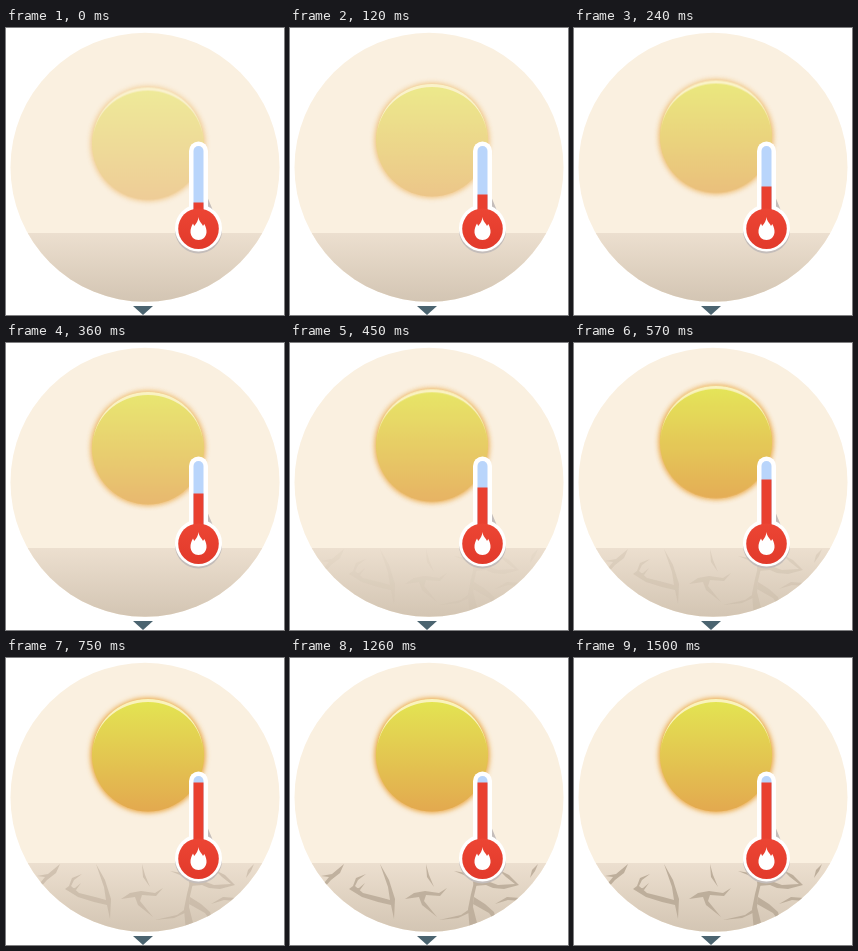
These frames come from a looping animation (278 px wide and 287 px high, 2.83 s). An HTML page:

```html
<!DOCTYPE html>
<html lang="en">
<head>
<meta charset="utf-8">
<title>Rising heat</title>
<style>
  html, body { margin: 0; width: 100%; height: 100%; overflow: hidden; background: #fff; }
  svg { display: block; width: 100vw; height: 100vh; }
  .sun, .level, .cracks { animation: 2830ms infinite both; }
  .sun { animation-name: rise; }
  .level { animation-name: heat; }
  .cracks { animation-name: dry; }

  @keyframes rise {
    0% { transform: translateY(18.5px); opacity: .5; animation-timing-function: steps(21); }
    22.26%, 100% { transform: none; opacity: 1; }
  }
  @keyframes heat {
    0% { transform: translateY(50px); animation-timing-function: steps(25); }
    26.5%, 100% { transform: none; }
  }
  @keyframes dry {
    0% { opacity: 0; }
    13.75% { opacity: 0; animation-timing-function: steps(12); }
    26.5% { opacity: .55; animation-timing-function: steps(1); }
    44.5% { opacity: .93; animation-timing-function: steps(1); }
    48.75% { opacity: .93; animation-timing-function: steps(4); }
    53%, 100% { opacity: 1; }
  }
</style>
</head>
<body>
<svg viewBox="0 0 278 287" preserveAspectRatio="none">
  <defs>
    <linearGradient id="sunFill" x2="0" y2="1">
      <stop stop-color="#e3e552"/>
      <stop offset="1" stop-color="#e3a94f"/>
    </linearGradient>
    <linearGradient id="groundFill" x2="0" y2="1">
      <stop stop-color="#ecdfcf"/>
      <stop offset="1" stop-color="#d3c5b3"/>
    </linearGradient>
    <linearGradient id="bulbFill" x2="0" y2="1">
      <stop stop-color="#ec4534"/>
      <stop offset="1" stop-color="#e23a2b"/>
    </linearGradient>
    <filter id="glow" x="-20%" y="-20%" width="140%" height="140%">
      <feGaussianBlur stdDeviation="2.6"/>
    </filter>
    <clipPath id="disc"><circle cx="139" cy="139.3" r="134.5"/></clipPath>
    <clipPath id="tube"><rect x="187.5" y="118" width="10" height="76" rx="5"/></clipPath>
  </defs>

  <g clip-path="url(#disc)">
    <rect width="278" height="287" fill="#faf0e0"/>
    <rect y="205" width="278" height="69" fill="url(#groundFill)"/>
    <g class="cracks" fill="#bdae9b">
      <path d="M54 206L50 215L41 222L33 231L30 230L39 219L31 218L42 216Z"/>
      <path d="M76 216L68 222L65 228L73 235L89 239L100 242L98 229L90 206L99 222L105 241L104 261L101 247L88 244L72 239L59 231L63 228L66 220Z"/>
      <path d="M60 231L69 230L75 225L70 232Z"/>
      <path d="M115 241L124 235L135 233L149 235L157 230L150 238L136 237L134 243L147 259L132 247L129 239Z"/>
      <path d="M136 206L139 217L144 229L137 219Z"/>
      <path d="M188 221L184 238L183 249L187 265L180 274L178 251L181 236L184 224L174 217L164 213L176 215Z"/>
      <path d="M183 224L197 223L208 227L225 226L216 219L209 212L219 217L229 227L214 231L203 230L196 227L184 228Z"/>
      <path d="M184 239L195 246L204 254L207 266L199 255L183 246Z"/>
      <path d="M181 250L171 257L149 262L168 260L181 254Z"/>
      <path d="M205 246L217 239L230 240L242 234L248 235L232 243L218 242Z"/>
      <path d="M248 206L245 213L240 220L242 212Z"/>
    </g>
  </g>

  <g class="sun">
    <circle cx="142" cy="97.5" r="57.5" fill="#e9a540" filter="url(#glow)"/>
    <circle cx="142" cy="97.5" r="56" fill="url(#sunFill)"/>
    <path d="M87 95A55 54 0 0 1 197 95A55 51 0 0 0 87 95Z" fill="#faf3bd"/>
  </g>

  <path d="M183 123V180H188V202H169A23.6 23.6 0 0 0 216 203Z" fill="#c4bdba" transform="translate(0 1.5)"/>
  <g fill="#fff">
    <rect x="183" y="113.5" width="19" height="80" rx="9.5"/>
    <circle cx="192.5" cy="200" r="23.5"/>
  </g>
  <g clip-path="url(#tube)">
    <rect x="187" y="118" width="11" height="76" fill="#b9d5fb"/>
    <rect class="level" x="187" y="124.5" width="11" height="76" fill="#e94030"/>
  </g>
  <circle cx="192.5" cy="200.7" r="20.3" fill="url(#bulbFill)"/>
  <path d="M192.5 189C193 194 196 195 197 198L198.3 196C200 199 200.7 202 200.5 204.5C200 209 197 212 192.5 212S185 209 184.5 204.5C184.3 201 185.5 198 187 195.5L188.2 198C190.5 195.5 192 193 192.5 189Z" fill="#fff"/>

  <path d="M127 278H147L137 287Z" fill="#4b6470"/>
</svg>
</body>
</html>
```
